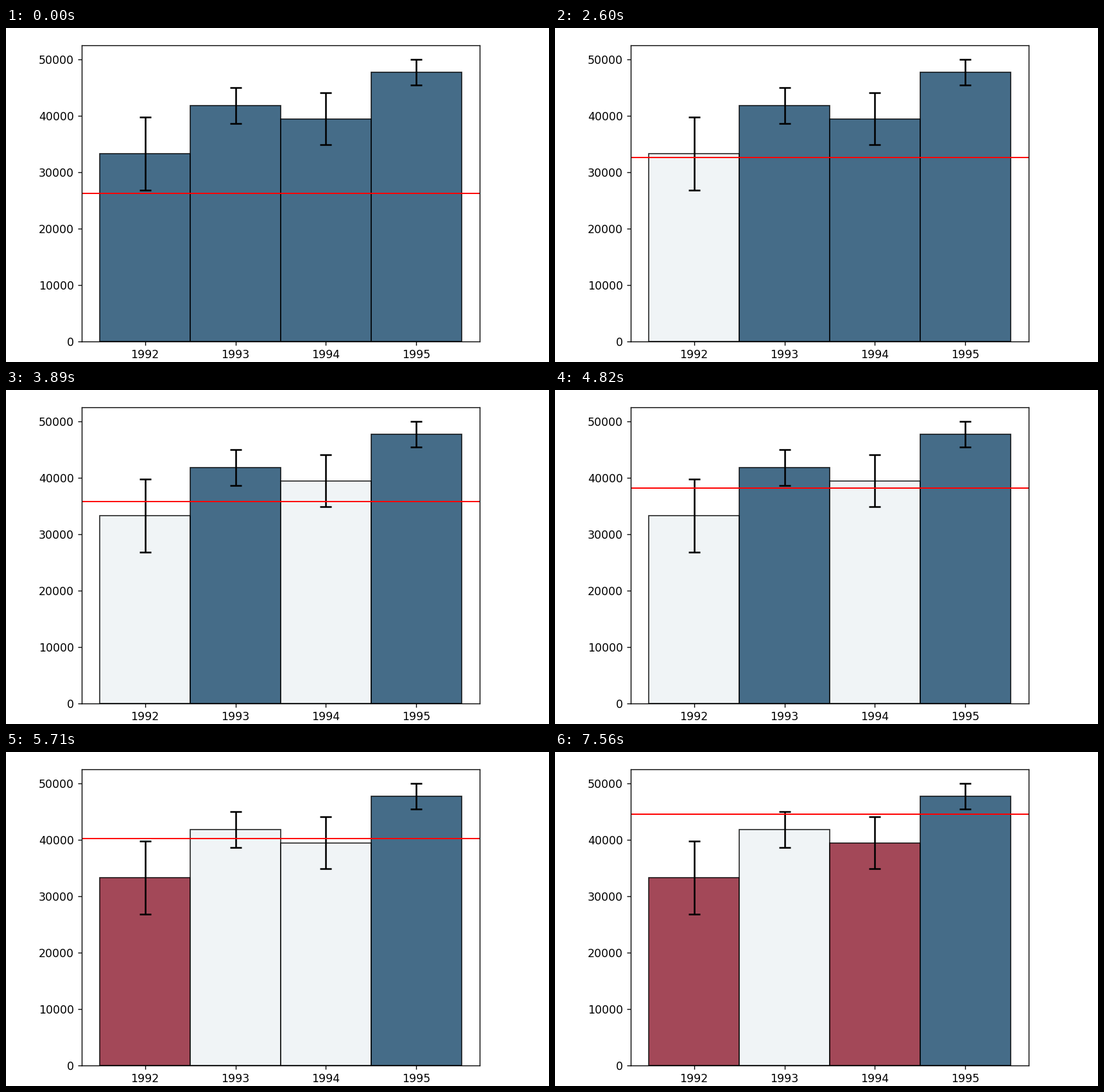
Write a matplotlib script that moves like this. It is 846 by 521 pixels and loops after 8 s.

```python
import numpy as np
import matplotlib.pyplot as plt
from matplotlib.animation import FuncAnimation

W, H, DPI = 846, 521, 125
LOOP, INTERVAL = 8000, 40
START, TICK = 26200, 400

BLUE, PALE, RED = "#16476a", "#edf2f4", "#8c1a2e"

# Yearly samples: mean and 95 % confidence half-width
np.random.seed(12345)
params = [(32000, 200000), (43000, 100000), (43500, 140000), (48000, 70000)]
samples = np.array([np.random.normal(m, s, 3650) for m, s in params])
means = samples.mean(axis=1)
errs = 1.96 * samples.std(axis=1, ddof=1) / np.sqrt(samples.shape[1])

# The threshold jumps two or three ticks at a time, at a nearly even pace
ticks = (2.775 * np.arange(18) - 0.42).astype(int)
times = np.interp(ticks, [0, 7, 30, 46], [0, 1180, 4820, 7560])


def threshold(ms):
    return START + TICK * ticks[times <= ms][-1]


def bar_color(mean, err, level):
    if level < mean - err:
        return BLUE
    return RED if level > mean + err else PALE


fig = plt.figure(figsize=(W / DPI, H / DPI), dpi=DPI, facecolor="white")
ax = fig.add_axes([118 / W, 32 / H, 620 / W, 462 / H])
x = np.arange(4)
bars = ax.bar(x, means, width=1, yerr=errs, capsize=5, color=BLUE,
              edgecolor="black", ecolor="black", linewidth=1, alpha=0.8,
              error_kw={"elinewidth": 1.5, "capthick": 1.5})
ax.set_xticks(x, [str(1992 + i) for i in x])
ax.set_xlim(-0.7, 3.7)
ax.set_ylim(0, 1.05 * (means + errs).max())
line = ax.axhline(START, color="red", linewidth=1.15)


def update(i):
    # Show the state reached by the end of the interval
    level = threshold((i + 1) * INTERVAL - 10)
    line.set_ydata([level, level])
    for bar, mean, err in zip(bars, means, errs):
        bar.set_facecolor(bar_color(mean, err, level))
    return [line, *bars]


anim = FuncAnimation(fig, update, frames=LOOP // INTERVAL, interval=INTERVAL,
                     repeat=True, repeat_delay=0, blit=False)
plt.show()
```
